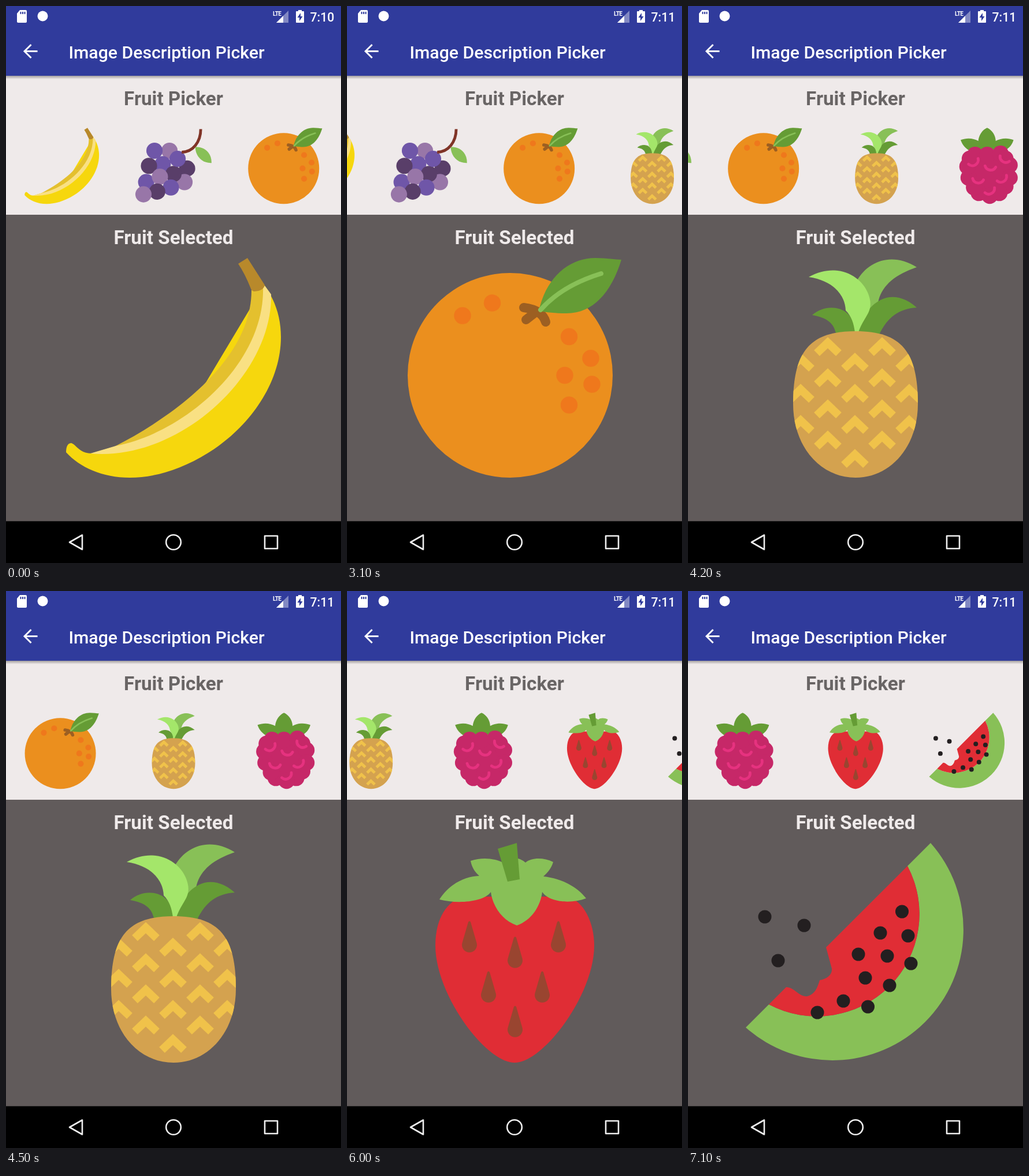
Recreate the animation shown at these times as an HTML page. Size 580 px wide and 966 px high, loop 7300 ms.

```html
<!DOCTYPE html>
<html lang="en">
<head>
<meta charset="utf-8">
<title>Image Description Picker</title>
<style>
  html, body { margin: 0; width: 100%; height: 100%; overflow: hidden; background: #000; }
  svg { display: block; width: 100vw; height: 100vh; font-family: Roboto, "Noto Sans", sans-serif; }
</style>
</head>
<body>
<svg id="stage" viewBox="0 0 580 966"></svg>
<script>
const LOOP = 7300, FRAME = 100;
const PITCH = 580 / 3, SCALE = 0.3465;
const SCROLL_TIME = 154;

const path = (fill, d) => `<path fill="${fill}" d="${d}"/>`;
const line = (stroke, width, d, cap = 'round') =>
  `<path fill="none" stroke="${stroke}" stroke-width="${width}" stroke-linecap="${cap}" d="${d}"/>`;
const dot = (fill, r, [x, y]) => `<circle cx="${x}" cy="${y}" r="${r}" fill="${fill}"/>`;
const dots = (fill, r, points) => points.map(p => dot(fill, r, p)).join('');
const stamp = (points, shape) =>
  points.map(([x, y]) => `<g transform="translate(${x} ${y})">${shape}</g>`).join('');

const LEAF = '#659c35', LIME = '#88c057', RED = '#e02d35', SEED = '#231f20';

function banana() {
  return path('#f6d70d', 'M104 774C104 764 107 758 113 758C122 761 127 776 148 776L300 730L447 484C466 510 476 540 476 574C476 655 420 732 350 775C242 842 148 822 104 774Z')
    + path('#e4c02e', 'M188 764C290 712 426 613 425 492L447 488C450 610 340 735 188 772Z')
    + path('#f9e083', 'M146 776L190 763C310 740 449 620 445 487L448 485L459 500C462 640 300 790 146 776Z')
    + path('#b8892b', 'M402 447L418 437L448 484Q446 494 430 495Q425 495 423 488Q414 465 402 447Z');
}

function grapes() {
  const purple = '#6f56a8', mauve = '#9876a8', dark = '#593e69';
  const bunch = [
    [mauve, 270, 552], [purple, 195, 552], [dark, 358, 641], [purple, 236, 619],
    [mauve, 345, 709], [dark, 290, 668], [purple, 310.5, 592.5], [dark, 167.5, 627.5],
    [purple, 153.5, 709], [mauve, 222, 682], [purple, 277, 736], [dark, 208.5, 756.5], [mauve, 140, 770]
  ];
  return bunch.map(([fill, ...p]) => dot(fill, 40.6, p)).join('')
    + line('#803427', 14, 'M426 444C426 510 385 559 331 559', 'butt')
    + path(LIME, 'M399 533C448 531 481 565 480 613C431 615 399 577 399 533Z');
}

function orange() {
  return dot('#eb8f1e', 177.5, [282.5, 640.5])
    + dots('#ef781c', 14.7, [[200, 537], [251.5, 515], [384.5, 573.5], [422, 611], [377, 640.5], [424, 656], [384.5, 692]])
    + line('#9c5f22', 16, 'M306 523Q338 527 344 548M310 544L328 530')
    + path(LEAF, 'M332 529C345 470 385 437 430 437C450 437 465 440 475 440C460 490 430 533 380 533C360 533 345 531 332 529Z')
    + line(LIME, 8, 'M335 527Q372 485 440 464');
}

function pineapple() {
  const body = 'M290 564C370 564 398 600 398 690C398 765 350 818 290 818C230 818 182 765 182 690C182 600 210 564 290 564Z';
  const peaks = [];
  for (let row = 0; row < 4; row++) {
    const y = 575 + row * 54;
    peaks.push([242, y], [336, y], [289, row < 3 ? y + 27 : 769]);
    if (row < 3) peaks.push([195, y + 27], [383, y + 27]);
  }
  return path(LIME, 'M292 477C313 440 355 427 396 453C355 467 332 488 328 520L314 545Z')
    + path(LEAF, 'M256 568C252 546 235 540 215 536C240 514 282 520 289 557V568Z')
    + path(LEAF, 'M294 568C305 516 350 482 396 523C365 525 345 540 331 570Z')
    + path('#a4e66a', 'M209 470C258 443 300 468 312 499C320 520 314 530 306 543Q298 556 295 566H289C287 550 283 538 273 528C272 500 250 476 209 470Z')
    + path('#d4a24f', body)
    + `<clipPath id="rind"><path d="${body}"/></clipPath><g clip-path="url(#rind)">`
    + stamp(peaks, line('#f0c24a', 14, 'M-19 27L0 9L19 27', 'butt')) + '</g>';
}

function raspberry() {
  const bumps = [
    [224, 573], [284, 573], [351, 567], [375, 592], [396, 624], [396, 687], [375, 730],
    [345, 763], [297, 777], [243, 763], [219, 735], [192, 687], [186, 631], [198, 592]
  ];
  const smiles = [
    [191, 619, 239, 591], [274, 628, 327, 634], [349, 578, 395, 605],
    [212, 691, 266, 698], [334, 703, 381, 675], [273, 762, 321, 737]
  ];
  return path(LEAF, 'M284 437C308 447 327 475 327 503C350 490 385 485 416 498C410 520 398 535 380 546L190 548C170 535 157 515 152 498C185 485 217 490 240 503C242 475 260 447 284 437Z')
    + path('#c62868', 'M' + bumps.join('L') + 'Z')
    + dots('#c62868', 41, bumps)
    + smiles.map(([x, y, u, v]) => line('#e6327f', 14, `M${x} ${y}A29 29 0 0 0 ${u} ${v}`)).join('');
}

function strawberry() {
  const seeds = [[212, 573], [291, 600], [366, 573], [245, 660], [338, 660], [291, 720]];
  return path(RED, 'M290 818C240 818 153 700 153 615C153 565 175 538 200 530H382C410 538 428 575 428 615C428 700 340 818 290 818Z')
    + path(LIME, 'M160 535C178 507 205 495 229 494C220 486 216 478 214 468C235 461 256 464 270 471Q290 455 309 471C320 462 340 462 357 470C354 480 348 488 340 495C367 498 396 510 414 533C388 543 350 540 338 522C335 546 320 571 294 580C268 571 252 546 249 522C236 540 190 543 160 535Z')
    + path(LEAF, 'M261 447L294 437L299 500L278 504Z')
    + stamp(seeds, path('#994530', 'M-2 1Q0 -2 2 1L12.7 38A13 13 0 1 1 -12.7 38Z'));
}

function watermelon() {
  return path(LIME, 'M420 437A226.7 226.7 0 0 1 100 757L140 717L380 477Z')
    .replace('L140 717L380 477Z', 'L140 717A177.5 177.5 0 0 0 380 477Z')
    + path(RED, 'M380 477A177.5 177.5 0 0 1 140 717L170 687C184 687 192 704 206 703C219 700 224 689 228 675C241 673 250 665 249 655L239 618Z')
    + dots(SEED, 11.5, [
      [133, 565], [201, 580], [156, 641], [370.5, 556], [333, 593], [381, 598], [295, 630],
      [345, 633], [386, 646], [307, 671], [349, 684], [269, 711], [311.5, 721], [224, 731]
    ]);
}

const fruits = [banana, grapes, orange, pineapple, raspberry, strawberry, watermelon];

// Each pick centres its fruit; lead is how far the scroll has run when the pick first shows.
const picks = [
  { at: 0, fruit: 0, from: 0, to: 0, lead: 0 },
  { at: 2200, fruit: 1, from: 0, to: 0, lead: 0 },
  { at: 3100, fruit: 2, from: 0, to: 1, lead: 79.5 },
  { at: 4200, fruit: 3, from: 1, to: 2, lead: 87 },
  { at: 5300, fruit: 4, from: 2, to: 3, lead: 10.6 },
  { at: 6000, fruit: 5, from: 3, to: 4, lead: 23.7 },
  { at: 6900, fruit: 6, from: 4, to: 4, lead: 0 }
];

function statusBar() {
  return path('#fff', 'M24 7H34Q36 7 36 9V27Q36 29 34 29H21Q19 29 19 27V13Z')
    + line('#303b9c', 2, 'M25.5 10V14M29 10V14M32.5 10V14', 'butt')
    + dot('#fff', 9, [63.5, 17.5])
    + '<text x="462" y="16.5" font-size="10" font-weight="700" letter-spacing="-.7">LTE</text>'
    + path('#fff6', 'M489 8V29H468Z') + path('#fff', 'M480 17V29H468Z')
    + path('#fff', 'M506 7H512V9H515Q516 9 516 10V28Q516 29 515 29H503Q502 29 502 28V10Q502 9 503 9H506Z')
    + path('#303b9c', 'M510 12L504.5 20H508V26L513.500 18H510Z')
    + '<text id="clock" x="526.500" y="26.500" font-size="21.2" font-weight="500"></text>';
}

function navBar() {
  return '<path d="M0 893.500H580V966H0Z"/>'
    + '<g fill="none" stroke="#eee" stroke-width="2.6" stroke-linejoin="round">'
    + '<path d="M110 930L132 917.500V942.500Z"/><circle cx="290" cy="930" r="12.800"/>'
    + '<path d="M448 919H470V941H448Z"/></g>';
}

const stage = document.getElementById('stage');
stage.innerHTML = `
  <defs>
    <linearGradient id="shade" x2="0" y2="1">
      <stop stop-opacity=".32"/><stop offset="1" stop-opacity="0"/>
    </linearGradient>
    ${fruits.map((draw, i) => `<g id="fruit${i}">${draw()}</g>`).join('')}
  </defs>
  <rect width="580" height="363" fill="#efeaea"/>
  <rect y="362" width="580" height="532" fill="#615b5b"/>
  <rect y="121" width="580" height="6" fill="url(#shade)"/>
  <rect width="580" height="121" fill="#303b9c"/>
  <g fill="#fff">
    ${statusBar()}
    ${line('#fff', 3, 'M54.500 78.500H33M43.500 67L32 78.500L43.500 90', 'butt')}
    <text x="108.500" y="90.500" font-size="30.2" font-weight="500">Image Description Picker</text>
  </g>
  <g font-size="33.2" font-weight="700" text-anchor="middle">
    <text x="290" y="171.500" fill="#696565">Fruit Picker</text>
    <text x="290" y="413" fill="#efeaea">Fruit Selected</text>
  </g>
  <g id="strip">${fruits.map((_, i) =>
    `<use href="#fruit${i}" transform="translate(${PITCH * (i + 0.5)} 277.2) scale(${SCALE}) translate(-290 -627.500)"/>`).join('')}</g>
  <use id="selected"/>
  ${navBar()}`;

const [clock, strip, selected] = ['clock', 'strip', 'selected'].map(id => document.getElementById(id));

function render(ms) {
  const time = Math.floor((ms % LOOP) / FRAME) * FRAME;
  const pick = picks.filter(p => p.at <= time).pop();
  const progress = Math.min(1, (time - pick.at + pick.lead) / SCROLL_TIME);
  const eased = 1 - (1 - progress) ** 2;
  const scroll = PITCH * (pick.from + (pick.to - pick.from) * eased);
  strip.setAttribute('transform', `translate(${-scroll} 0)`);
  selected.setAttribute('href', `#fruit${pick.fruit}`);
  clock.textContent = time < 3100 ? '7:10' : '7:11';
}

const start = performance.now();
function tick() {
  render(performance.now() - start);
  requestAnimationFrame(tick);
}
tick();
</script>
</body>
</html>
```
